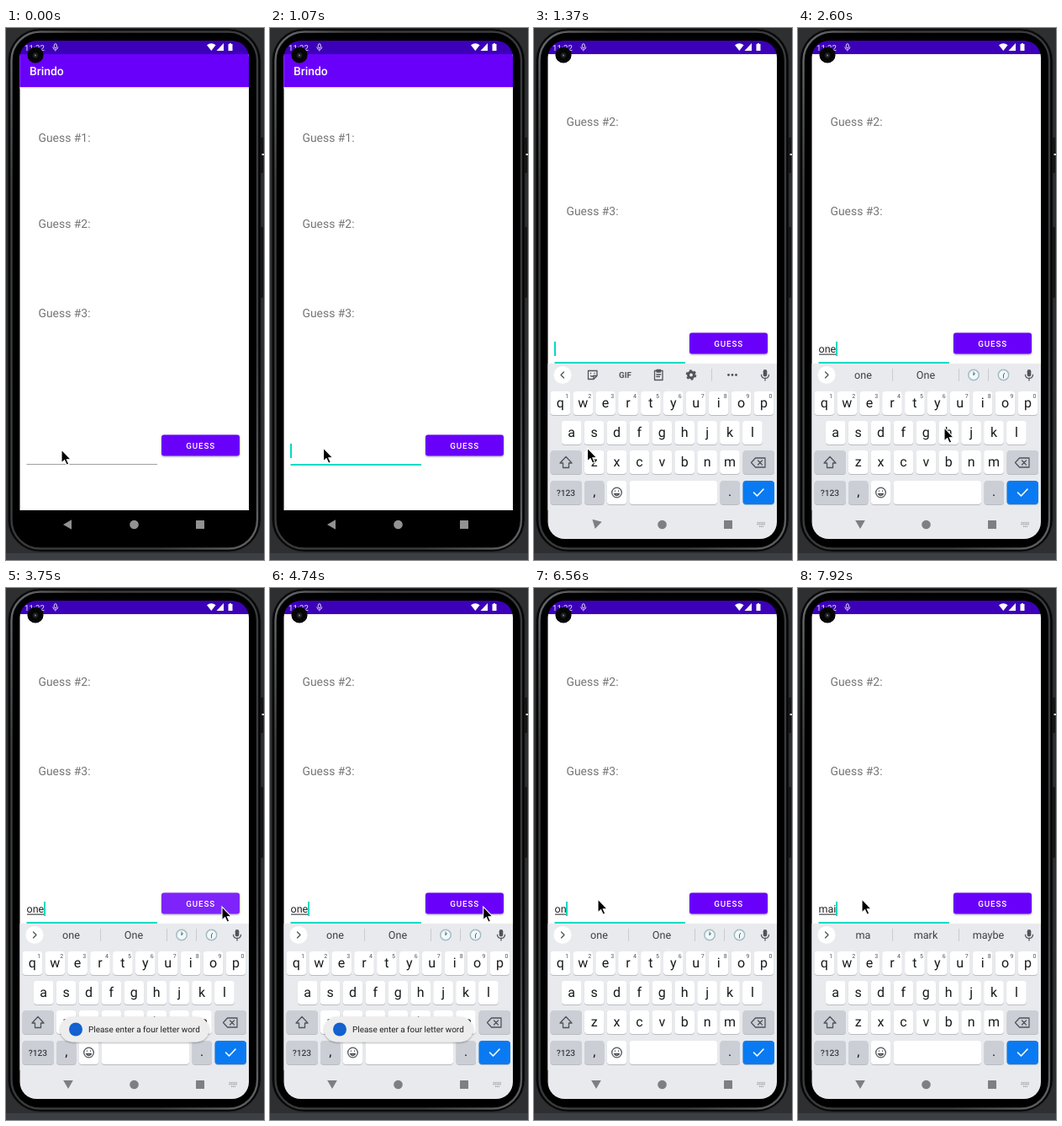
Animation of 307x631 px, one loop 8000 ms. Source, as an HTML page:

```html
<!DOCTYPE html>
<html lang="en">
<head>
<meta charset="utf-8">
<title>Word guessing app</title>
<style>
html, body { margin: 0; width: 100%; height: 100%; overflow: hidden; background: #2d2f31; }
svg { display: block; width: 307px; height: 631px; }
text { font-family: Roboto, sans-serif; text-rendering: geometricPrecision; white-space: pre; }
.mid { text-anchor: middle; }
.label { font-size: 13.9px; fill: #757575; }
.line { fill: none; stroke: #50545a; stroke-width: 1.3; stroke-linecap: round; stroke-linejoin: round; }
.key { font-size: 16px; fill: #18191b; }
.hint { font-size: 7px; fill: #4f5358; }
.word { font-size: 12.6px; fill: #3c4043; }
</style>
</head>
<body>
<svg viewBox="0 0 307 631">
  <defs>
    <clipPath id="screen"><rect x="16.5" y="15" width="272.5" height="591" rx="20"/></clipPath>
    <clipPath id="below"><rect x="16" y="31" width="273" height="575"/></clipPath>
    <clipPath id="btnClip"><rect x="185" y="482.4" width="93" height="25" rx="3"/></clipPath>
    <linearGradient id="rim" x1="0" y1="0" x2="1" y2="1">
      <stop offset="0" stop-color="#6a6c6e"/><stop offset=".15" stop-color="#3a3c3d"/>
      <stop offset=".8" stop-color="#38393b"/><stop offset="1" stop-color="#626466"/>
    </linearGradient>
    <filter id="soft" x="-10%" y="-40%" width="120%" height="190%">
      <feDropShadow dx="0" dy="1" stdDeviation="1" flood-opacity=".35"/>
    </filter>
  </defs>

  <rect width="307" height="631" fill="#2d2f31"/>
  <rect y="623" width="307" height="8" fill="#3b3f43"/>
  <path d="M303 130H306V172H303ZM303 236H306V320H303Z" fill="#141516"/>
  <rect x="304.5" y="149" width="2.5" height="2" fill="#d8d8d8"/>
  <rect x="2.5" y="1" width="300.5" height="620" rx="38" fill="#060607" stroke="#1c1d1e" stroke-width=".8"/>
  <rect x="6.500" y="4.500" width="292.500" height="613" rx="34" fill="#000" stroke="url(#rim)" stroke-width="2.400"/>

  <g clip-path="url(#screen)">
    <rect x="16" y="31" width="273" height="541" fill="#fff"/>
    <g clip-path="url(#below)">
      <g id="page">
        <rect x="16" y="70" width="273" height="1" fill="#d9d9d9"/>
        <rect x="16" y="71" width="273" height="1" fill="#f2f2f2"/>
        <rect x="16" y="31" width="273" height="39" fill="#6900fa"/>
        <text x="28" y="56" font-size="13.9" font-weight="500" fill="#fff">Brindo</text>
        <text class="label" x="38.5" y="135">Guess #1:</text>
        <text class="label" x="38.5" y="237">Guess #2:</text>
        <text class="label" x="38.5" y="342.5">Guess #3:</text>
        <rect x="185" y="482.4" width="93" height="25" rx="3" fill="#6900fa" filter="url(#soft)"/>
        <circle id="ripple" cx="257" cy="500" fill="#fff" clip-path="url(#btnClip)"/>
        <text class="mid" x="231.7" y="498.5" font-size="9.8" font-weight="500" letter-spacing=".9" fill="#fff">GUESS</text>
        <rect id="rule" x="24.5" width="155.5" y="517"/>
        <text id="entry" x="24.5" y="506" font-size="12.5" fill="#212121"></text>
        <rect id="compose" x="25" y="507.6" height="1" fill="#212121"/>
        <rect id="caret" y="493" width="2" height="17" fill="#03dac5"/>
      </g>
    </g>
    <rect x="16" y="572" width="273" height="34" fill="#000"/>
    <g id="board"></g>
    <g id="nav">
      <path id="back" d="M68 589L78 583.2V594.8Z"/>
      <circle cx="152.5" cy="589" r="5.3"/>
      <rect x="226" y="584" width="10" height="10" rx=".6"/>
      <path id="swap" d="M265.500 586.800H275.500M265.500 588.800H275.500M268 591.200H273" stroke="#85888c" stroke-width="1.100" stroke-dasharray="1.300 .7"/>
    </g>
    <rect x="16" y="15" width="273" height="16" fill="#3c00b8"/>
    <text x="22" y="26.5" font-size="9.6" fill="#eee8fa">11:22</text>
    <g fill="none" stroke="#e6dff7">
      <rect x="57.3" y="18.8" width="3" height="5" rx="1.5"/>
      <path d="M55.7 22.5Q56 25.6 58.8 25.6T61.9 22.5M58.8 25.6V27.5" stroke-width=".9"/>
    </g>
    <path d="M239 20.3Q244.300 16.300 249.600 20.300L244.300 27ZM259 18V27H250.500ZM264.500 19H266V18H268V19H269.500V27H264.500Z" fill="#fff"/>
  </g>
  <circle cx="35" cy="32" r="9.6" fill="#050505"/>
  <circle cx="35" cy="32.500" r="3.200" fill="#1d2022"/>
  <circle cx="35" cy="32.500" r="1.100" fill="#777b7e"/>

  <g id="toast">
    <rect x="64.500" y="508.500" width="177" height="30" rx="15" fill="#ededee" filter="url(#soft)"/>
    <circle cx="83" cy="523.500" r="8" fill="#1261cf"/>
    <text x="98" y="527" font-size="9.93" fill="#202020">Please enter a four letter word</text>
  </g>
  <path id="mouse" d="M0 0V15.800L3.600 12.600L6.200 18.300L8.800 17.200L6.300 11.700H11.200Z" fill="#000" stroke="#fff" stroke-width="1.100"/>
</svg>

<script>
const $ = id => document.getElementById(id);
const LOOP = 8000;

function add(parent, tag, attrs, text) {
  const node = document.createElementNS('http://www.w3.org/2000/svg', tag);
  for (const k in attrs) node.setAttribute(k, attrs[k]);
  if (text !== undefined) node.textContent = text;
  parent.appendChild(node);
  return node;
}
const set = (id, attrs) => { for (const k in attrs) $(id).setAttribute(k, attrs[k]); };

// Keyboard
const board = $('board');
const line = (parent, d, more) => add(parent, 'path', { d, class: 'line', ...more });
const write = (parent, cls, x, y, s) => add(parent, 'text', { class: 'mid ' + cls, x, y }, s);

function key(x, y, w, fill = '#fff') {
  add(board, 'rect', { x, y: y + 1, width: w, height: 28, rx: 4, fill: '#b9bcc1' });
  add(board, 'rect', { x, y, width: w, height: 28, rx: 4, fill });
}

add(board, 'rect', { x: 16, y: 398, width: 273, height: 208, fill: '#e8eaed' });
const PITCH = 26.9, GREY = '#cbced5';
[['qwertyuiop', 31.3, 431], ['asdfghjkl', 44.7, 466], ['zxcvbnm', 71.6, 501]].forEach(([row, x0, y], r) => {
  [...row].forEach((c, i) => {
    const x = x0 + PITCH * i;
    key(x - 11.8, y, 23.6);
    write(board, 'key', x, y + 19, c);
    if (!r) write(board, 'hint', x + 8, y + 8, (i + 1) % 10);
  });
});
key(19.5, 501, 37.5, GREY);
key(248.5, 501, 37.5, GREY);
key(19.5, 537, 37.5, GREY);
key(60, 537, 23.5, GREY);
key(86.7, 537, 23.6);
key(113.6, 537, 104.5);
key(221.5, 537, 23.5, GREY);
key(248.5, 537, 37.5, '#0a7af2');
line(board, 'M38 508.5L45 516H41.500V521.500H34.500V516H31Z');
line(board, 'M263.500 510H275V521H263.500L258.500 515.500ZM266.500 513L271.500 518M271.500 513L266.500 518');
line(board, 'M261.500 551L265.500 555L273 547', { style: 'stroke:#fff;stroke-width:1.6' });
add(board, 'text', { class: 'mid', x: 38, y: 555, 'font-size': 10.2, 'font-weight': 500, fill: '#3c4043' }, '?123');
write(board, 'key', 71.8, 555, ',');
write(board, 'key', 233.2, 555, '.');
add(board, 'circle', { cx: 98.5, cy: 551, r: 5.8, class: 'line' });
line(board, 'M95.500 552.500Q98.500 556.500 101.500 552.500ZM96.400 549V549.300M100.600 549V549.300');

// Suggestion strip
add(board, 'circle', { cx: 34, cy: 411.5, r: 10.5, fill: '#fff' });
const chevron = line(board, 'M35.500 408L32 411.500L35.500 415');
add(board, 'rect', { x: 272.7, y: 405, width: 4.6, height: 8.5, rx: 2.3, fill: '#50545a' });
line(board, 'M270.500 411.500Q271 415.500 275 415.500T279.500 411.500M275 415.500V418');

const tools = add(board, 'g', {});
line(tools, 'M64.500 406.500H75V412.500L71 416.500H64.500ZM71 416.500V412.500H75M67.500 409.500V409.800M72 409.500V409.800M67.500 412.500Q69 414 70.500 412.500');
add(tools, 'text', { class: 'mid', x: 108.5, y: 415, 'font-size': 9.8, 'font-weight': 700, fill: '#50545a' }, 'GIF');
line(tools, 'M143.500 406.500H153V417.500H143.500ZM146 405.500H150.500V408H146ZM145.800 411H150.800M145.800 413.500H149.500');
add(tools, 'circle', { cx: 187, cy: 411.5, r: 3.4, fill: 'none', stroke: '#50545a', 'stroke-width': 3 });
add(tools, 'circle', { cx: 187, cy: 411.5, r: 5.4, fill: 'none', stroke: '#50545a', 'stroke-width': 1.8, 'stroke-dasharray': '2.83 2.83' });
const divider = (parent, x) => add(parent, 'rect', { x, y: 404, width: 1, height: 15, fill: '#c8cbcf' });
divider(tools, 211);
[231.5, 236, 240.5].forEach(cx => add(tools, 'circle', { cx, cy: 411.5, r: 1.4, fill: '#50545a' }));

const hints = add(board, 'g', {});
divider(hints, 112);
divider(hints, 191);
const words = [77.5, 152, 226.5].map(x => write(hints, 'word', x, 416, ''));
const clocks = add(hints, 'g', {});
divider(clocks, 226);
[[209, 'V408M209 411.500L210.300 409.500'], [244.500, 'V415M244.500 411.500L245.600 409.500']].forEach(([cx, hands]) => {
  add(clocks, 'circle', { cx, cy: 411.5, r: 6.2, fill: '#f2f8fa', stroke: '#a3bcc6', 'stroke-width': 1.5 });
  line(clocks, `M${cx} 411.500${hands}`, { style: 'stroke:#35606b;stroke-width:.9' });
});

// Timeline: [time, typed text, suggestions]
const typing = [
  [0, '', ''], [1960, 'o', ''], [2130, 'o', 'o of on'], [2190, 'on', 'o of on'],
  [2250, 'on', 'on one only'], [2420, 'one', 'one One'],
  [6560, 'on', 'one One'], [6620, 'on', 'on one only'], [6680, 'o', 'on one only'],
  [6740, 'o', 'o of on'], [6820, '', 'o of on'], [6900, '', ''],
  [7800, 'm', ''], [7860, 'ma', 'ma mark maybe'], [7920, 'mai', 'ma mark maybe']
];
// [time, page shift, keyboard drop, back icon angle]
const opening = [
  [0, 0, 209, 0], [1130, 25, 175, 0], [1190, 79, 72, -25],
  [1370, 121, 0, -76], [1430, 121, 0, -85], [1540, 121, 0, -90]
];
// [time, x, y]
const path = [
  [0, 66, 500], [419, 66, 500], [420, 64.5, 499], [480, 63.5, 498], [2419, 63.5, 498],
  [2420, 82, 495], [2600, 174, 474], [2780, 228, 430], [2960, 262, 386], [3060, 267, 383],
  [3299, 267, 383], [3300, 262, 380], [3360, 257, 378], [4629, 257, 378], [4630, 255, 378],
  [4860, 250, 378], [5159, 250, 378], [5160, 248, 390], [5400, 214, 576], [5520, 194, 502],
  [5580, 180, 480], [5700, 112, 402], [5850, 76, 369], [LOOP, 76, 369]
];
const STEP = 60, BLINK = 493;

const at = (table, t) => table.findLast(row => row[0] <= t);
const ramp = (t, a, b) => Math.min(1, Math.max(0, (t - a) / (b - a)));

function pointer(t) {
  const i = path.findLastIndex(p => p[0] <= t);
  const a = path[i], b = path[i + 1];
  const u = Math.floor((t - a[0]) / STEP) * STEP / (b[0] - a[0]);
  return [a[1] + (b[1] - a[1]) * u, a[2] + (b[2] - a[2]) * u];
}

function lastEdit(t) {
  let when = 1070;
  typing.forEach((row, i) => {
    if (i && row[0] <= t && row[1] !== typing[i - 1][1]) when = row[0];
  });
  return when;
}

function draw(t) {
  const [, shift, drop, turn] = at(opening, t);
  const open = t >= 1130, focused = t >= 890;
  set('page', { transform: `translate(0 ${-shift})` });
  set('board', { transform: `translate(0 ${drop})`, display: open ? 'inline' : 'none' });
  set('nav', { fill: open ? '#7d7f82' : '#929292' });
  set('swap', { display: open ? 'inline' : 'none' });
  set('back', { transform: `rotate(${turn} 73.5 588.5)` });
  set('rule', { height: focused ? 2 : 1, fill: focused ? '#03dac5' : '#a0a0a0' });

  const [, text, list] = at(typing, t);
  $('entry').textContent = text;
  const width = text ? $('entry').getComputedTextLength() : 0;
  const lit = t >= 1070 && Math.floor((t - lastEdit(t)) / BLINK) % 2 === 0;
  set('compose', { width });
  set('caret', { x: Math.round(24.2 + width), opacity: lit ? 1 : 0 });

  const picks = list ? list.split(' ') : [];
  tools.setAttribute('display', list ? 'none' : 'inline');
  hints.setAttribute('display', list ? 'inline' : 'none');
  clocks.setAttribute('display', picks.length === 2 ? 'inline' : 'none');
  words.forEach((w, i) => { w.textContent = picks[i] || ''; });
  chevron.setAttribute('transform', list ? 'rotate(180 34 411.5)' : '');

  const grow = ramp(t, 3440, 3640);
  set('ripple', { r: 85 * grow, opacity: 0.14 * (1 - ramp(t, 3800, 3920)) });
  set('toast', { opacity: ramp(t, 3520, 3700) * (1 - ramp(t, 5640, 5840)) });
  set('mouse', { transform: `translate(${pointer(t).join(' ')})` });
}

const start = performance.now();
function frame() {
  draw((performance.now() - start) % LOOP);
  requestAnimationFrame(frame);
}
frame();
</script>
</body>
</html>
```
